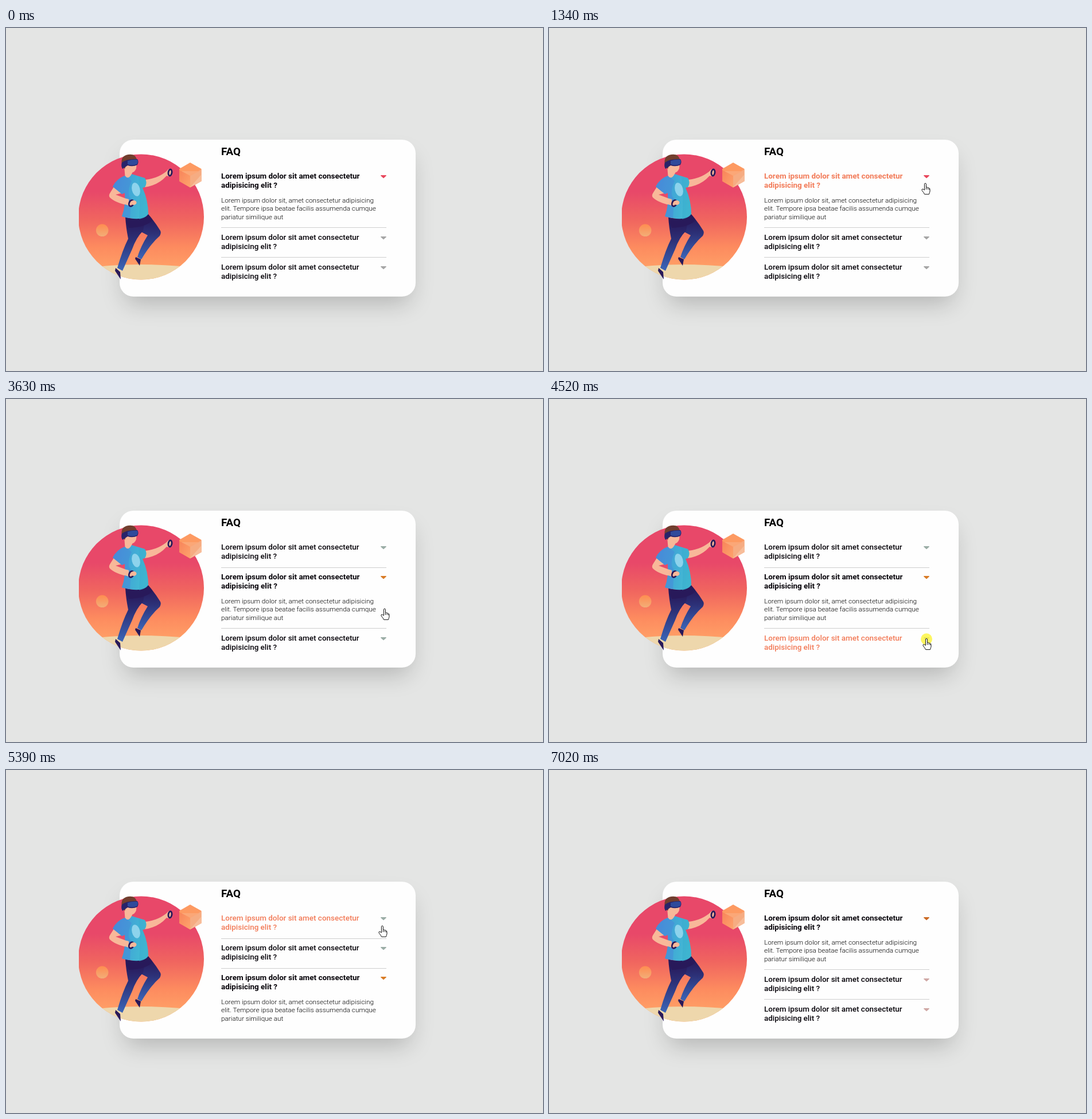
An HTML page for the animation above (7.55 s loop, 936x599 px).

```html
<!DOCTYPE html>
<html lang="en">
<head>
<meta charset="utf-8">
<title>FAQ accordion</title>
<style>
  html, body { margin: 0; width: 100%; height: 100%; overflow: hidden; background: #e4e5e4; }
  .card { position: absolute; left: 198px; top: 195px; width: 516px; height: 274px; border-radius: 24px;
    background: #fefefe; box-shadow: 0 21px 42px -10px rgba(0, 0, 0, .22); }
  svg { position: absolute; left: 0; top: 0; }
  text { font-family: Roboto, sans-serif; }
  .heading { font-size: 18.8px; font-weight: 700; }
  .question { font-size: 13.44px; font-weight: 500; }
  .open .question { font-weight: 700; }
  .answer { font-size: 11.76px; font-weight: 300; fill: #000; display: none; }
  .open .answer { display: inline; }
</style>
</head>
<body>
<div class="card"></div>
<svg width="936" height="599" viewBox="0 0 936 599">
  <defs>
    <linearGradient id="sky" x2="0" y2="1">
      <stop offset=".3" stop-color="#e84869"/><stop offset=".52" stop-color="#f0655f"/>
      <stop offset=".74" stop-color="#fd8b5f"/><stop offset=".92" stop-color="#ffa167"/>
    </linearGradient>
    <linearGradient id="sun" x2="0" y2="1">
      <stop stop-color="#ff8c50"/><stop offset="1" stop-color="#f2ae78"/>
    </linearGradient>
    <linearGradient id="shirt" x2="1" y2=".2">
      <stop stop-color="#4a86d8"/><stop offset=".5" stop-color="#41a5d6"/><stop offset="1" stop-color="#43bcd3"/>
    </linearGradient>
    <linearGradient id="pants" x2="0" y2="1">
      <stop offset=".1" stop-color="#28195a"/><stop offset=".45" stop-color="#2d3279"/><stop offset="1" stop-color="#3b66b8"/>
    </linearGradient>
    <linearGradient id="cube" x2="1" y2="1">
      <stop stop-color="#f8845a"/><stop offset="1" stop-color="#fea36c"/>
    </linearGradient>
    <clipPath id="disc"><circle cx="235.5" cy="330" r="109.5"/></clipPath>
    <clipPath id="edge"><path d="M127 200h230v250H127z"/></clipPath>
  </defs>

  <g clip-path="url(#edge)">
    <circle cx="235.5" cy="330" r="109.5" fill="url(#sky)"/>
    <path clip-path="url(#disc)" d="M120 422Q175 413 235 413T350 422V445H120z" fill="#eed7ac"/>
  </g>
  <circle cx="167.7" cy="353.3" r="10.8" fill="url(#sun)"/>

  <path d="M321 235L340.5 246V267.5L321 278.5L302 267.5V246z" fill="#fd9a62"/>
  <path d="M302 248L321 258V278.5L302 267.5z" fill="url(#cube)"/>
  <path d="M321 258L340.5 247V267.5L321 278.5z" fill="#f6ac82"/>
  <path d="M306 250H337L321 258z" fill="#fba777"/>
  <path d="M321 278L340.5 256V267.5z" fill="#f7bd9a"/>

  <!-- legs -->
  <path d="M236 331L247 324Q260 339 269 354Q271 358 268 363Q252 377 236 404L229 400Q235 381 247 362L226 351z" fill="url(#pants)"/>
  <path d="M208 330Q222 337 243 332L239 354Q227 366 220 386L203 424L194 419Q203 388 213 368Q209 348 208 330z" fill="url(#pants)"/>
  <path d="M208 330Q222 337 247 325L255 336Q244 348 214 349z" fill="#28195a"/>
  <path d="M226 400L235 404L233 415L225 403zM191 419L199 426L200 439L190 424z" fill="#28195a"/>

  <!-- body and arms -->
  <path d="M243 265Q264 263 280 250Q284 244 289 247L290 256Q287 261 280 258Q265 275 242 278z" fill="#f8b899"/>
  <path d="M189 276L203 288L191 291L212 299Q219 298 227 302Q224 311 214 310Q190 305 181 296Q178 293 182 287z" fill="#f8b899"/>
  <path d="M206 240L222 241Q223 249 219 255L220 262L208 264L207 253z" fill="#f8b899"/>
  <path d="M207 258Q213 266 219 255L242 262Q247 270 242 278L238 279Q248 302 248 325Q238 339 202 329Q209 310 207 288L202 290L186 277Q193 263 207 258z" fill="url(#shirt)"/>
  <path d="M219 267Q209 290 218 298L216 332Q208 332 202 329Q209 310 207 288L202 290L186 277Q193 263 207 258z" fill="#478bd9" opacity=".55"/>
  <path d="M231 260Q235 300 232 334Q243 332 248 325Q248 302 238 279L242 278Q247 270 242 262z" fill="#39a9cc" opacity=".45"/>
  <ellipse cx="226.5" cy="282" rx="7" ry="12" transform="rotate(-14 226.5 282)" fill="#8dd3ec"/>
  <path d="M206 297L214 299V310L204 307z" fill="#f8b899"/>
  <g fill="#f8b899" stroke="#28195a" stroke-width="2.8">
    <ellipse cx="286" cy="252.5" rx="3" ry="5.6" transform="rotate(8 286 252.5)"/>
    <ellipse cx="218.5" cy="306" rx="3.8" ry="5.6" transform="rotate(25 218.5 306)"/>
  </g>
  <ellipse cx="222.5" cy="305" rx="5" ry="4" fill="#f8b899"/>

  <!-- head -->
  <path d="M206 232H228L227 245Q224 254 215 252Q207 249 206 241z" fill="#f8b899"/>
  <path d="M202 239Q199 223 213 221Q225 219 228 229L212 233L207 246z" fill="#713e2e"/>
  <path d="M202 235Q210 228 229 229Q232 233 229 239Q221 243 212 240L203 246Q200 241 202 235z" fill="#28246a"/>
  <path d="M212 232Q220 229 229 230Q231 234 228 238Q219 241 212 238z" fill="#2f4a9b"/>

  <text class="heading" x="375" y="222">FAQ</text>
  <g id="list"></g>
  <circle id="press" r="10" fill="#fdf43a" opacity=".8"/>
  <g id="cursor" fill="#fff" stroke="#111" stroke-linejoin="round">
    <path id="hand" d="M-1.6 12V1.7a1.5 1.5 0 0 1 3 0V7.5Q3 6 4.2 8Q6 7 6.6 9Q8 8.6 8 11V14Q7.6 16 6.4 19.3H-1.5L-3 16.5L-6 12.5Q-6.6 10 -4.3 10.2zM1.4 8V11M4.2 8.5V11M6.6 9.5V11.5"/>
    <path id="pointer" d="M.5.5V16.5L4.3 13L6.8 18.5L9.2 17.4L6.8 12.2H12z"/>
  </g>
</svg>
<script>
const LOOP = 7550;
const QUESTION = ["Lorem ipsum dolor sit amet consectetur", "adipisicing elit ?"];
const ANSWER = ["Lorem ipsum dolor sit, amet consectetur adipisicing",
  "elit. Tempore ipsa beatae facilis assumenda cumque", "pariatur similique aut"];

// start time, open item, arrow colour when open, arrow colour when closed
const STATES = [
  [0, 0, "#e8475c", "#a6a6a6"],
  [1950, 0, "#d0462f", "#a6a6a6"],
  [2680, 1, "#d97c27", "#9bada6"],
  [4590, 2, "#d97c27", "#9bada6"],
  [5940, 0, "#cb6a24", "#cfa8a5"]
];
// time, x, y of the cursor tip
const PATH = [
  [310, 862, 588], [520, 716, 380], [650, 662, 270], [790, 659, 214],
  [980, 659, 214], [1200, 657, 260], [1340, 656, 271], [1620, 658, 271],
  [1950, 658, 271], [2180, 666, 325], [2410, 659, 372.5], [2680, 659, 372.5],
  [3100, 660, 366], [3630, 660, 366], [4250, 658, 418.5], [4990, 658, 418],
  [5390, 656, 272], [5670, 656, 261], [6470, 656, 261], [6720, 735, 400], [6990, 868, 590]
];
const CLICKS = [2610, 4520, 5870];

const byId = id => document.getElementById(id);
const show = (el, on) => el.setAttribute("visibility", on ? "visible" : "hidden");
const move = (el, x, y) => el.setAttribute("transform", `translate(${x} ${y})`);
const lines = (rows, y, step) =>
  rows.map((row, i) => `<tspan x="375" y="${Math.round(y + i * step)}">${row}</tspan>`).join("");

byId("list").innerHTML = `<g>
  <path class="rule" d="M375 242.5H663" stroke="#cecece"/>
  <text class="question">${lines(QUESTION, 263, 16)}</text>
  <text class="answer">${lines(ANSWER, 305, 14.28)}</text>
  <path class="arrow" d="M653.8 257.7H662.2L658 261.6z" stroke-width="1.4" stroke-linejoin="round"/>
</g>`.repeat(3);
const items = [...byId("list").children];
show(items[0].querySelector(".rule"), false);

function cursorAt(t) {
  const next = PATH.findIndex(p => p[0] > t);
  if (next < 1) return null;
  const [t0, x0, y0] = PATH[next - 1], [t1, x1, y1] = PATH[next];
  const k = (t - t0) / (t1 - t0);
  return [x0 + (x1 - x0) * k, y0 + (y1 - y0) * k];
}

function draw(now) {
  const t = now % LOOP;
  const [, open, openColor, closedColor] = STATES.filter(s => s[0] <= t).pop();
  const tip = cursorAt(t);
  const [cx, cy] = tip || [0, 0];
  const inList = cx >= 375 && cx <= 664 && cy >= 249 && cy < 450;

  items.forEach((item, i) => {
    const y = i * 52 + (i > open ? 54.6 : 0);
    const hover = inList && cy >= 249 + y && cy < 284 + y;
    const color = i === open ? openColor : closedColor;
    const arrow = item.querySelector(".arrow");
    move(item, 0, Math.round(y));
    move(item.querySelector(".rule"), 0, i > open ? -1 : 0);
    item.setAttribute("class", i === open ? "open" : "");
    item.querySelector(".question").setAttribute("fill", hover ? "#f27a57" : "#050208");
    arrow.setAttribute("fill", color);
    arrow.setAttribute("stroke", color);
  });

  show(byId("hand"), tip && inList);
  show(byId("pointer"), tip && !inList);
  move(byId("cursor"), cx, cy);
  show(byId("press"), CLICKS.some(c => t >= c && t < c + 70));
  move(byId("press"), cx, cy + 1);
}

const start = performance.now();
function tick() {
  draw(performance.now() - start);
  requestAnimationFrame(tick);
}
tick();
</script>
</body>
</html>
```
